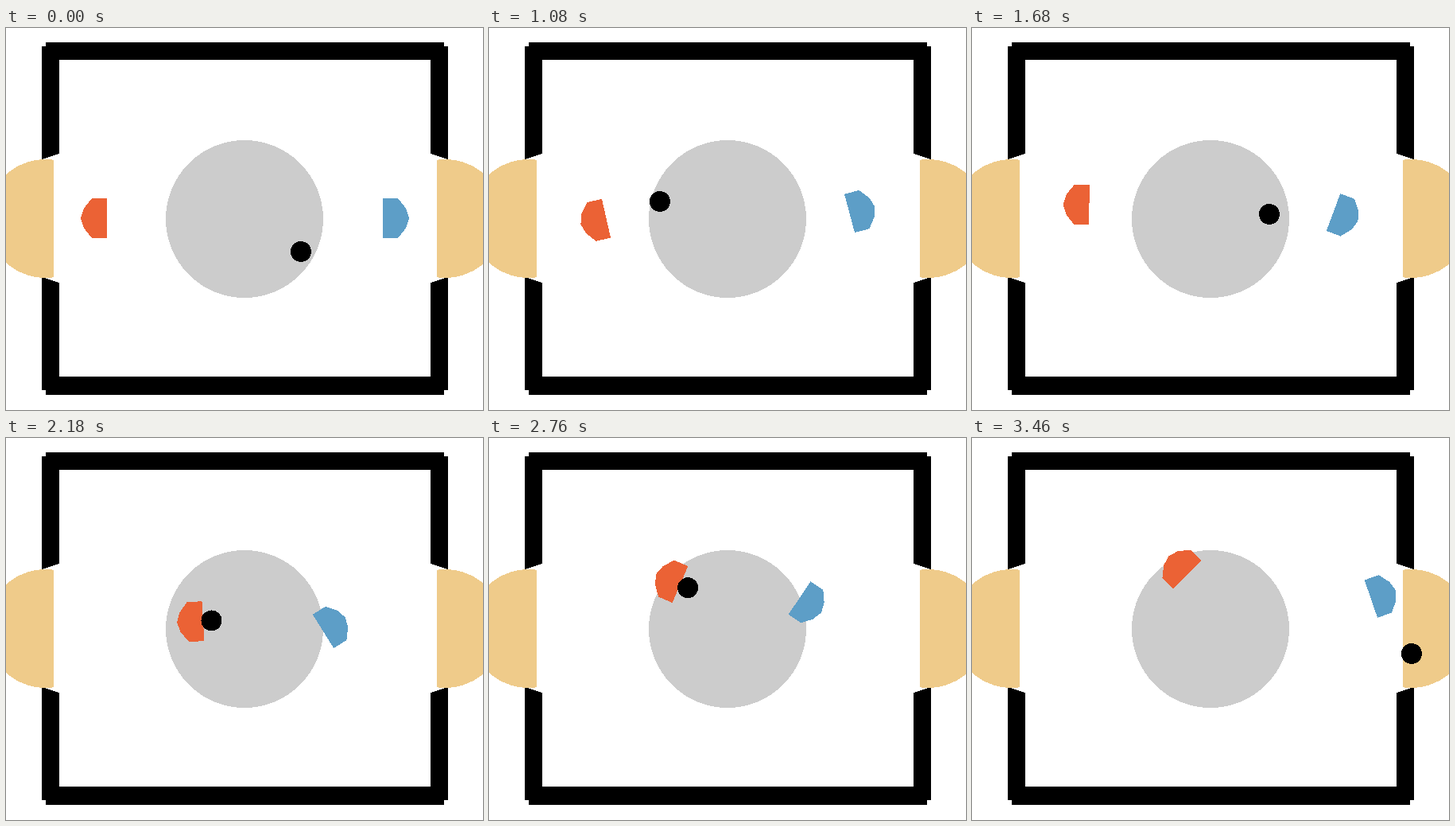
Write an HTML page that moves like this. It is 600 by 480 pixels and loops after 3.48 s.

```html
<!DOCTYPE html>
<html lang="en">
<head>
<meta charset="utf-8">
<title>Air hockey</title>
<style>
  html, body { margin: 0; width: 600px; height: 480px; overflow: hidden; background: #fff; }
  svg { display: block; shape-rendering: crispEdges; }
</style>
</head>
<body>
<svg width="600" height="480" viewBox="0 0 600 480">
  <defs>
    <path id="bat" d="M6.5-25V25H-12.5L-22.5 12.5L-26.5 0L-22.5-12.5L-12.5-25Z"/>
    <path id="post" d="M45 23H67V158L45 165Z"/>
    <path id="goal" fill="#efcb8a" d="M60 165.7A74.5 74.5 0 1 0 60 313.3Z"/>
  </defs>
  <circle cx="300" cy="240" r="99" fill="#ccc"/>
  <path d="M50 18H551V40H50ZM50 438H551V461H50Z"/>
  <use href="#post"/>
  <use href="#post" transform="matrix(-1 0 0 1 601 0)"/>
  <use href="#post" transform="matrix(1 0 0 -1 0 478)"/>
  <use href="#post" transform="matrix(-1 0 0 -1 601 478)"/>
  <use href="#goal"/>
  <use href="#goal" transform="matrix(-1 0 0 1 602 0)"/>
  <use id="red" href="#bat" fill="#eb6235"/>
  <g id="blue"><use href="#bat" fill="#5d9ec7" transform="scale(-1 1)"/></g>
  <circle id="puck" r="13"/>
</svg>
<script>
const LOOP = 3480, STEP = 20, REACH = 17, TOP = 57;
const bats = {
  red: { home: [120.5, 239, 0], side: 1 },
  blue: { home: [480.5, 239, 0], side: -1 }
};

// Bats go from home through spots [ms, x, y, degrees].
// The puck waits, is held [bat, from, to, turn], then flies straight to the goal.
const rounds = [
  {
    start: 0, end: 980, puck: [371, 281], goal: [553, 285],
    holds: [["blue", 400, 480], ["red", 560, 760, 232]],
    red: [[500, 240, 200, 0], [600, 249.7, 151.5, -4.6], [760, 250, 131, 25]],
    blue: [[140, 496, 264, 10], [440, 385, 264, 14], [600, 377.6, 246.7, 20], [980, 500, 240, -15]]
  },
  {
    start: 1000, end: 1580, puck: [215, 218], goal: [538, 2 * TOP - 276],
    holds: [["red", 1220, 1240]],
    red: [[1080, 141.2, 240.7, -12.8], [1240, 202, 220, -49]],
    blue: [[1080, 459.8, 231.3, -15], [1300, 435, 220, -25], [1580, 507, 235, 25]]
  },
  {
    start: 1600, end: 3460, puck: [374, 234], goal: [553, 271],
    holds: [["blue", 1860, 2060], ["red", 2180, 2320], ["blue", 2520, 2600],
      ["red", 2740, 2880], ["blue", 3020, 3100], ["red", 3200, 3240]],
    red: [[1680, 141, 222, 0.6], [2180, 241.5, 230.5, -3.5], [2480, 122, 235, 0],
      [2760, 234.5, 181.5, 23.3], [2920, 218, 77, 8], [3460, 266, 167, 45]],
    blue: [[1680, 460.6, 233.8, 20.5], [1860, 390, 232, 8], [2180, 404.5, 239.5, -32],
      [2460, 518, 264, 0], [2760, 396, 204.6, 34], [3100, 405, 190, -20], [3460, 508, 200, -19]]
  }
];

const lerp = (a, b, u) => a + (b - a) * u;

// Smooth path through the spots, at rest at both ends.
function batAt(round, name, t) {
  const keys = [[round.start, ...bats[name].home], ...round[name]];
  const last = keys.length - 1;
  const i = Math.max(0, keys.slice(0, last).filter(k => k[0] <= t).length - 1);
  const a = keys[i], b = keys[i + 1], span = b[0] - a[0];
  const u = Math.min(1, (t - a[0]) / span);
  const slope = (k, c) => k > 0 && k < last
    ? (keys[k + 1][c] - keys[k - 1][c]) / (keys[k + 1][0] - keys[k - 1][0]) : 0;
  return [1, 2, 3].map(c =>
    lerp(a[c], b[c], u * u * (3 - 2 * u)) +
    span * u * (1 - u) * ((1 - u) * slope(i, c) - u * slope(i + 1, c)));
}

// The held puck sits in front of the bat, or turned round it.
function heldAt(round, [name, , , turn = 0], t) {
  const [x, y, angle] = batAt(round, name, t);
  const a = (angle + turn) * Math.PI / 180, r = REACH * bats[name].side;
  return [x + r * Math.cos(a), y + r * Math.sin(a)];
}

function puckAt(round, t) {
  const { holds, goal, end } = round;
  const hold = holds.filter(h => h[1] <= t).pop();
  if (!hold) return round.puck;
  const leave = hold[2];
  if (t <= leave) return heldAt(round, hold, t);
  const next = holds[holds.indexOf(hold) + 1];
  const from = heldAt(round, hold, leave);
  const to = next ? heldAt(round, next, next[1]) : goal;
  const u = Math.min(1, (t - leave) / ((next ? next[1] : end) - leave));
  const y = lerp(from[1], to[1], u);
  return [lerp(from[0], to[0], u), TOP + Math.abs(y - TOP)]; // bounce off the top wall
}

const place = (id, [x, y, angle = 0]) => document.getElementById(id)
  .setAttribute("transform", `translate(${x} ${y}) rotate(${angle})`);
const began = performance.now();

function draw() {
  const t = Math.floor((performance.now() - began) % LOOP / STEP) * STEP;
  const round = rounds.filter(r => r.start <= t).pop();
  for (const name in bats) place(name, batAt(round, name, t));
  place("puck", puckAt(round, t));
  requestAnimationFrame(draw);
}
draw();
</script>
</body>
</html>
```
